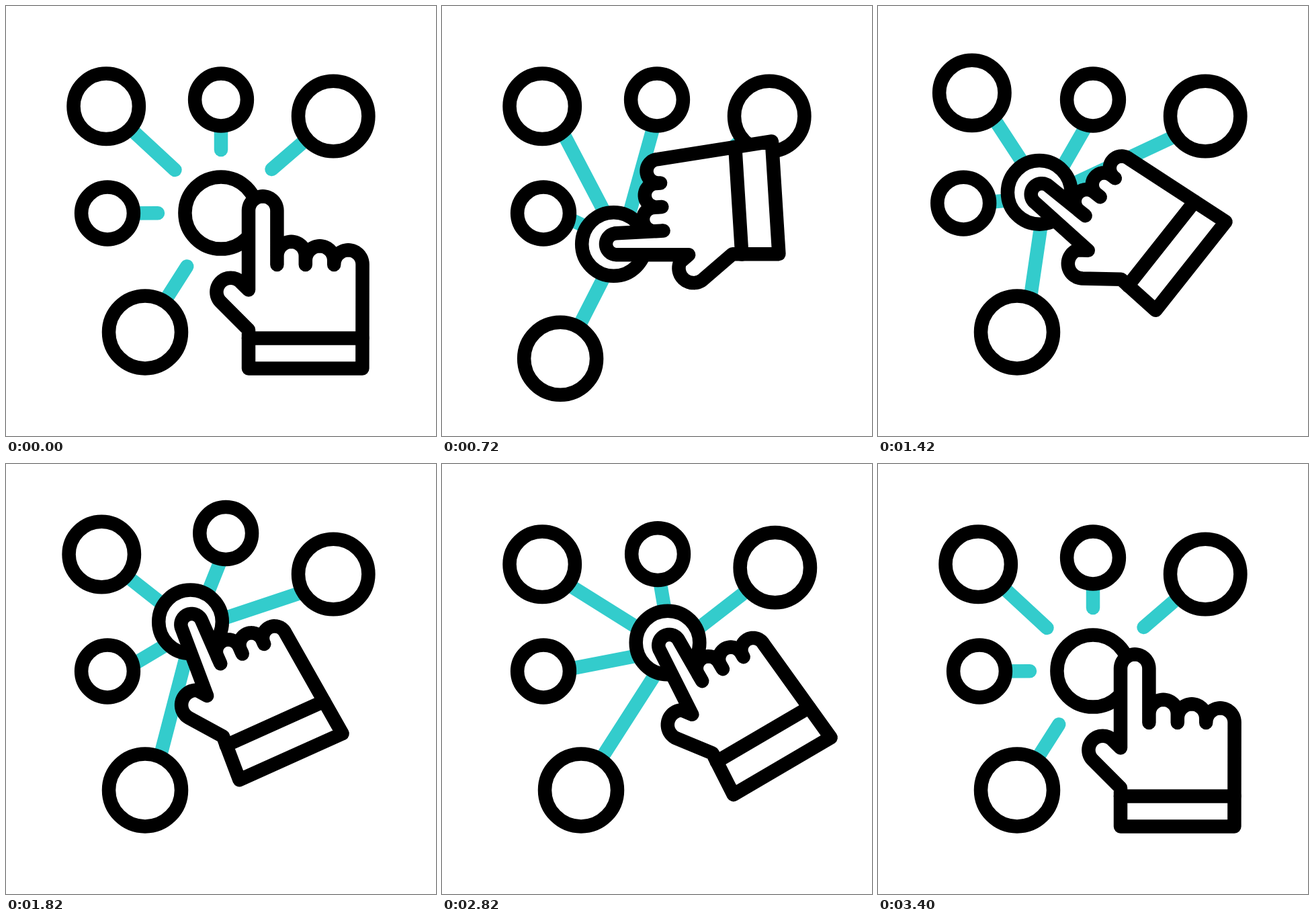
Animation of 640 by 640 pixels, one loop 3.6 s. Source, as an HTML page with a canvas:

```html
<!DOCTYPE html>
<html lang="en">
<head>
<meta charset="utf-8">
<title>Hand dragging a network node</title>
<style>
  html, body { margin: 0; width: 100%; height: 100%; overflow: hidden; background: #fff; }
  canvas { display: block; width: 100vw; height: 100vh; }
</style>
</head>
<body>
<canvas id="stage" width="640" height="640"></canvas>
<script>
const ctx = document.getElementById('stage').getContext('2d');
const LOOP = 3600, STEP = 20, STROKE = 20.5;
const CYAN = '#33cccc', RAD = Math.PI / 180;

const lerp = (a, b, u) => a + (b - a) * u;
const mix = (p, q, u) => [lerp(p[0], q[0], u), lerp(p[1], q[1], u)];
const ease = (t, start, end) => {
  const u = Math.min(1, Math.max(0, (t - start) / (end - start)));
  return u * u * (3 - 2 * u);
};
const rotate = ([x, y], deg) => {
  const c = Math.cos(deg * RAD), s = Math.sin(deg * RAD);
  return [x * c - y * s, x * s + y * c];
};
const add = (p, q) => [p[0] + q[0], p[1] + q[1]];

// Outer nodes: centre, radius, free line end, push offset and its start, peak and end times.
const nodes = [
  { at: [149.2, 149.2], r: 48.7, end: [251.5, 244], push: [-16.3, -34.5], times: [1200, 1600, 2000] },
  { at: [320, 139.5], r: 38.9, end: [320, 214], push: [12.5, -63.5], times: [1600, 2000, 3000] },
  { at: [487.2, 164], r: 52.2, end: [395.5, 243], push: [39.8, -45.6], times: [2000, 2400, 3000] },
  { at: [151, 308.5], r: 38.9, end: [226, 308.2], push: [-56, -35], times: [800, 1200, 1600] },
  { at: [207, 485.4], r: 54, end: [269.3, 387.5], push: [-34.5, 44], times: [400, 800, 1200] }
];

// Drag legs of the central node: start time, bend, destination, hand angle on arrival.
const home = [320, 308], homeAngle = -47;
const legs = [
  [400, [284, 325], [248, 362], -99],
  [800, [275, 345], [243, 328], -70],
  [1200, [242, 284], [236, 240], -38],
  [1600, [269.5, 235.5], [303, 231], -14],
  [2000, [361, 203], [416, 209], 30],
  [2400, [354, 197.6], home, homeAngle]
];

// Hand measurements, relative to the centre of the fingertip.
const openHand = {
  tip: 21.2, knuckle: 21.2, first: 21.2, web: 80.5, tops: [67.5, 74, 80],
  crook: [-21.2, 118], thumb: [-47.8, 121.2, 21, 135, 315], wrist: [-21.2, 177.5],
  base: [[-21.2, 235], [148.2, 235]], cuff: [[-21.2, 190], [148.2, 190]]
};
const pressHand = {
  tip: 16, knuckle: 17.8, first: 15.3, web: 70.7, tops: [59, 64, 69],
  crook: [-22.7, 106], thumb: [-43, 112, 22, 143, 298], wrist: [-25.8, 171],
  base: [[-30, 240], [138, 240]], cuff: [[-27, 185], [132.8, 185]]
};

function arc(x, y, r, from, to) {
  return Array.from({ length: 25 }, (_, i) => add([x, y], rotate([r, 0], lerp(from, to, i / 24))));
}

// Outline points, followed by the two ends of the cuff line.
function handPoints(h) {
  const pts = [h.base[0], h.wrist, ...arc(...h.thumb), h.crook, ...arc(0, 0, h.tip, 180, 360)];
  h.tops.forEach((top, i) => {
    const x = h.first + i * 2 * h.knuckle;
    pts.push([x, h.web], ...arc(x + h.knuckle, top, h.knuckle, 180, 360));
  });
  return [...pts, h.base[1], ...h.cuff];
}

const restPoints = handPoints(openHand).map(p => add(p, [382.2, 304.5]));
const pressPoints = handPoints(pressHand).map(p => add(p, [0, 4.5]));

function dragPose(t) {
  let from = home, fromAngle = homeAngle;
  for (let i = 0; i < legs.length; i++) {
    const [start, bend, to, angle] = legs[i];
    const end = i + 1 < legs.length ? legs[i + 1][0] : 3000;
    if (t < end) {
      const u = ease(t, start, end);
      return { at: mix(mix(from, bend, u), mix(bend, to, u), u), angle: lerp(fromAngle, angle, u) };
    }
    from = to;
    fromAngle = angle;
  }
  return { at: home, angle: homeAngle };
}

function trace(points, close) {
  ctx.beginPath();
  points.forEach(p => ctx.lineTo(...p));
  if (close) {
    ctx.closePath();
    ctx.fill();
  }
  ctx.stroke();
}

function ring([x, y], r) {
  ctx.beginPath();
  ctx.arc(x, y, r, 0, 2 * Math.PI);
  ctx.fill();
  ctx.stroke();
}

function draw(t) {
  const press = ease(t, 0, 400) - ease(t, 3000, 3400);
  const { at, angle } = dragPose(t);
  const joint = add(at, rotate([0, 11 * press], angle));

  ctx.fillStyle = '#fff';
  ctx.fillRect(0, 0, 640, 640);
  ctx.lineWidth = STROKE;
  ctx.lineCap = ctx.lineJoin = 'round';

  const placed = nodes.map(n => {
    const [start, peak, end] = n.times;
    const amount = t < peak ? ease(t, start, peak) : 1 - ease(t, peak, end);
    return { ...n, now: add(n.at, n.push.map(v => v * amount)) };
  });

  ctx.strokeStyle = CYAN;
  for (const n of placed) {
    const dx = n.end[0] - n.at[0], dy = n.end[1] - n.at[1];
    const k = 0.55 * n.r / Math.hypot(dx, dy);
    trace([add(n.now, [dx * k, dy * k]), mix(n.end, joint, press)]);
  }

  ctx.strokeStyle = '#000';
  ring(at, lerp(53.6, 47.3, press));
  placed.forEach(n => ring(n.now, n.r));

  const hand = pressPoints.map((p, i) => mix(restPoints[i], add(at, rotate(p, angle)), press));
  trace(hand.slice(0, -2), true);
  trace(hand.slice(-2));
}

const began = performance.now();
function tick() {
  const t = (performance.now() - began) % LOOP;
  draw(Math.floor(t / STEP) * STEP);
  requestAnimationFrame(tick);
}
tick();
</script>
</body>
</html>
```
